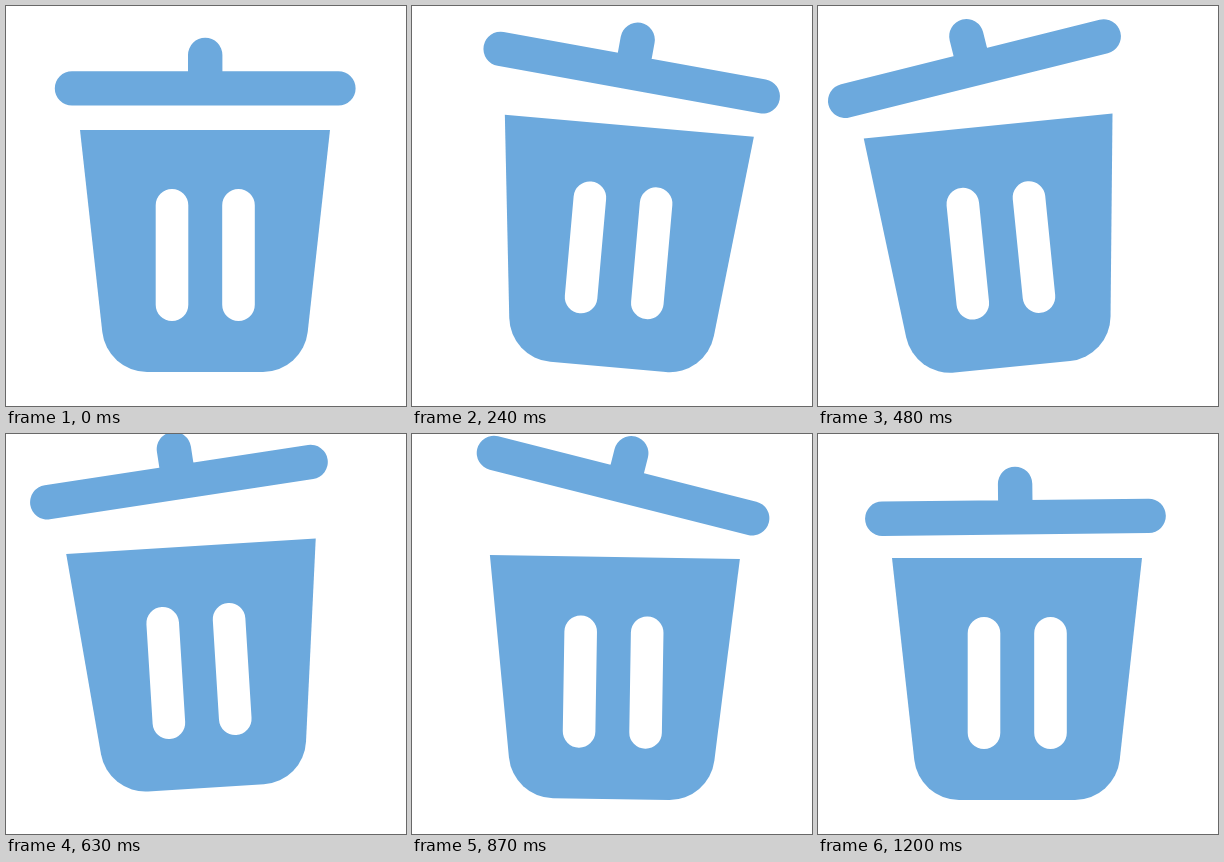
An HTML page that plays this animation: 400x400 px, repeating every 2230 ms.

```html
<!DOCTYPE html>
<html lang="en">
<head>
<meta charset="utf-8">
<title>Shaking bin</title>
<style>
  html, body { margin: 0; width: 100%; height: 100%; overflow: hidden; background: #fff; }
  svg { display: block; width: 100%; height: 100%; }
</style>
</head>
<body>
<svg viewBox="0 0 400 400">
  <g id="body">
    <path d="M74 124H324L301.7 326A45 45 0 0 1 257 366H141A45 45 0 0 1 96.3 326Z" fill="#6ca9dd"/>
    <path d="M166 199.2V298.8M232.5 199.2V298.8" stroke="#fff" stroke-width="32.6" stroke-linecap="round"/>
  </g>
  <g id="lid" stroke="#6ca9dd" stroke-width="34.4" stroke-linecap="round">
    <path d="M66 82.4H332.4M199.2 49V82"/>
  </g>
</svg>
<script>
const LOOP = 2230, MOVE = 1200, STEP = 30;
const HALF_BASE = 58;

// time, x shift, y shift, angle
const lidKeys = [
  [0, 0, 0, 0],
  [195, 25.4, -16.5, 11.5],
  [240, 20.5, -15.75, 10.26],
  [360, -11, -5, -1.9],
  [480, -42.75, -19.75, -13.98],
  [510, -45, -25, -14.4],
  [540, -42, -29.9, -13.5],
  [630, -26.25, -34.25, -8.7],
  [870, 11.85, -30.75, 14.2],
  [1035, -9.9, -5, -0.5],
  [1050, -9.75, -5.1, -1],
  [1080, -7.8, -5.6, -1.3],
  [1200, -1.75, 0.9, -0.6]
];

// time, x shift, hop height, angle
const bodyKeys = [
  [0, 0, 0, 0],
  [190, -2.9, 0, 6],
  [240, -2.95, 0, 5.05],
  [460, -4.65, -0.5, -6],
  [480, -4.65, -0.6, -5.745],
  [540, -2, 3, -5.2],
  [630, 1, 8.6, -3.56],
  [800, 0, 0, 1.1],
  [870, 0, 0, 0.92],
  [1035, 2.35, 0.5, -2.1],
  [1050, 2.35, 0.5, -2.06],
  [1140, 0, 0, 0],
  [1200, 0, 0, 0]
];

const slope = (keys, i, c) =>
  (keys[i + 1][c] - keys[i][c]) / (keys[i + 1][0] - keys[i][0]);

// Flat at turning points, so the curve never overshoots a key.
function tangent(keys, i, c) {
  if (i === 0) return 0;
  if (i === keys.length - 1) return slope(keys, i - 1, c);
  const a = slope(keys, i - 1, c), b = slope(keys, i, c);
  return a * b > 0 ? 2 * a * b / (a + b) : 0;
}

function sample(keys, t) {
  let i = 0;
  while (i < keys.length - 2 && t >= keys[i + 1][0]) i++;
  const span = keys[i + 1][0] - keys[i][0];
  const u = (t - keys[i][0]) / span, v = 1 - u;
  return [1, 2, 3].map(c =>
    v * v * (1 + 2 * u) * keys[i][c] +
    u * u * (3 - 2 * u) * keys[i + 1][c] +
    span * u * v * (v * tangent(keys, i, c) - u * tangent(keys, i + 1, c)));
}

const lid = document.getElementById("lid");
const body = document.getElementById("body");

function place(el, x, y, angle, cx, cy) {
  el.setAttribute("transform", `translate(${x} ${y}) rotate(${angle} ${cx} ${cy})`);
}

function draw(ms) {
  const t = Math.min(Math.floor(ms / STEP) * STEP, MOVE);
  const [lx, ly, la] = sample(lidKeys, t);
  const [bx, hop, ba] = sample(bodyKeys, t);
  const rise = HALF_BASE * Math.abs(Math.sin(ba * Math.PI / 180));
  place(lid, lx, ly, la, 199.2, 82.4);
  place(body, bx, -rise - hop, ba, 199.2, 366);
}

const start = performance.now();
function tick() {
  draw((performance.now() - start) % LOOP);
  requestAnimationFrame(tick);
}
tick();
</script>
</body>
</html>
```
